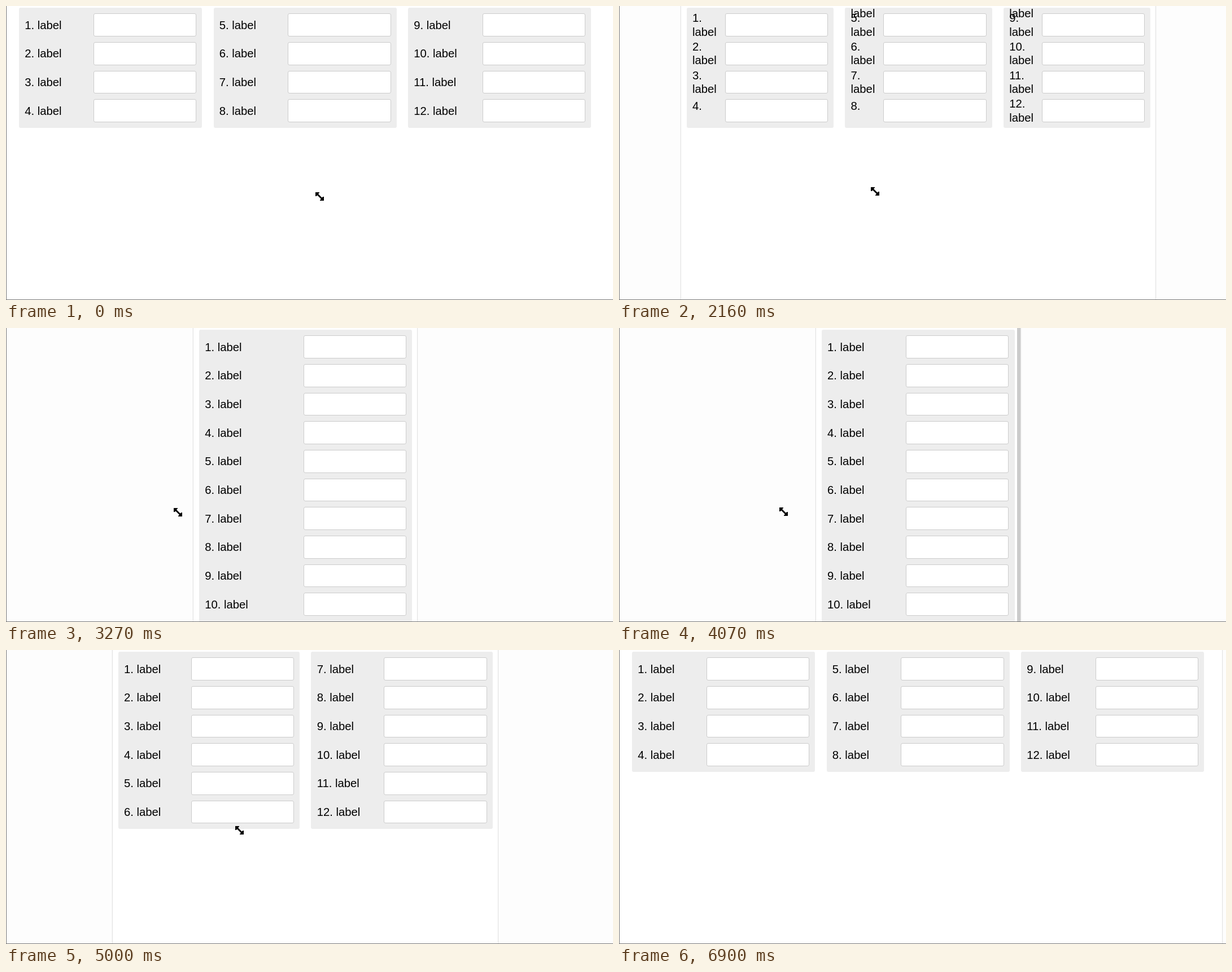
Recreate the animation shown at these times as an HTML page. Size 1075 by 521 pixels, loop 7.31 s.

```html
<!DOCTYPE html>
<html lang="en">
<head>
<meta charset="utf-8">
<title>Responsive form columns</title>
<style>
  html, body { margin: 0; width: 100%; height: 100%; overflow: hidden; background: #fdfdfd; }
  #stage { position: absolute; left: 0; top: 0; width: 1075px; height: 521px; overflow: hidden;
    font: 20.27px/24.32px "Liberation Sans", Arial, sans-serif; color: #000; }
  #stage * { position: absolute; box-sizing: border-box; }
  #page { top: -10px; height: 560px; background: #fff; box-shadow: 0 0 2px rgba(0, 0, 0, .32); }
  #thumb { top: 0; width: 6px; height: 521px; background: #cbcbcb; }
  .panel { top: 3.3px; background: #ededed; border-radius: 3px; }
  .field { height: 40.53px; background: #fff; border: 1px solid #ccc; border-radius: 3px; }
  .text { white-space: pre; }
  #cursor { left: 0; top: 0; }
  #frame { inset: 0; border: solid #777; border-width: 0 0 1px 1px; }
</style>
</head>
<body>
<div id="stage">
  <div id="page"></div>
  <div id="form"></div>
  <div id="thumb"></div>
  <svg id="cursor" width="15" height="15">
    <path d="M0 0H7V1L5 3 11.5 9.5 13.5 8H15V15H8V14L10 12 3.5 5.5 1.5 7H0Z"/>
  </svg>
  <div id="frame"></div>
</div>
<script>
const LOOP = 7310, COUNT = 12;
const U = 1.01333;
const PAD = 10 * U, GAP = 20 * U, PITCH = 50 * U, LINE = 24.32;
const FIELD = 180 * U, MIN_COL = 250 * U, MAX_FORM = 1000 * U, TOP = 3.3;
const AXIS = 1059;                       // left + right edge of the centred page

// time, page left edge, lag of the content's right side, cursor x, cursor y
const KEYS = [
  [0, -38, 0, 555, 337.5],
  [1019, -38, 0, 555, 337.5],
  [1020, -38, 0, 555, 336.5],
  [1300, -38, 0, 555, 336.5],
  [1310, -20, 2, 552, 336],
  [1550, 9.5, 4, 523, 332],
  [1620, 9.5, 4, 523, 332],
  [2040, 81, 2, 473, 329],
  [2710, 237.5, 1.5, 364.5, 326.5],
  [2770, 237.5, 1.5, 364.5, 326.5],
  [2830, 255, 2, 353, 326.5],
  [3270, 331.5, 2, 304.5, 326.5],
  [3300, 331.5, 2, 304.5, 326.5],
  [3510, 350, 0, 290, 325.5],
  [4060, 350, 0, 290, 325.5],
  [4480, 291, 4, 345, 321],
  [4510, 291, 4, 345, 321],
  [4750, 243, 2, 377, 320],
  [5530, 73, 0, 491, 318.5],
  [5650, 61.5, -1, 498.5, 318.5],
  [5710, 61.5, -1, 498.5, 318.5],
  [6310, 6, 0, 541, 320],
  [6520, -8, 0, 552, 320.5],
  [6700, -8, 0, 552, 320.5],
  [6890, -8, 0, 538.5, 295.5],
  [LOOP, -8, 0, 538.5, 295.5]
];

const $ = id => document.getElementById(id);
const form = $("form");

function add(cls) {
  const el = document.createElement("div");
  el.className = cls;
  form.append(el);
  return el;
}

function place(el, x, y, w) {
  el.style.left = x + "px";
  el.style.top = y + "px";
  if (w !== undefined) el.style.width = w + "px";
}

function write(el, text) {
  if (el.textContent !== text) el.textContent = text;
}

const panels = [0, 1, 2].map(() => add("panel"));
const items = Array.from({ length: COUNT }, () => ({
  field: add("field"), head: add("text"), tail: add("text")
}));

const pen = document.createElement("canvas").getContext("2d");
pen.font = '20.27px "Liberation Sans", Arial, sans-serif';
const widths = items.map((_, i) => pen.measureText(`${i + 1}. label`).width);

function sample(t) {
  let i = 1;
  while (i < KEYS.length - 1 && KEYS[i][0] <= t) i++;
  const a = KEYS[i - 1], b = KEYS[i], k = (t - a[0]) / (b[0] - a[0]);
  return a.map((v, n) => v + (b[n] - v) * k);
}

function layout(left, lag) {
  let x0 = left + 10.5, width = AXIS - left - PAD + lag - x0;
  if (width > MAX_FORM) {
    x0 += (width - MAX_FORM) / 2;
    width = MAX_FORM;
  }
  const cols = Math.max(1, Math.min(3, Math.floor((width + GAP) / (MIN_COL + GAP))));
  const rows = COUNT / cols;
  const colW = (width - GAP * (cols - 1)) / cols;
  const inner = colW - 2 * PAD;
  const fieldW = Math.max(FIELD, (inner - PAD) / 2);
  const room = inner - PAD - fieldW;
  const colX = c => x0 + c * (colW + GAP);

  panels.forEach((p, c) => {
    p.style.display = c < cols ? "block" : "none";
    p.style.height = PAD + rows * PITCH + "px";
    place(p, colX(c), TOP, colW);
  });

  items.forEach((item, i) => {
    const col = Math.floor(i / rows), row = i % rows;
    const x = colX(col) + PAD, y = TOP + PAD + row * PITCH, mid = y + 20 * U;
    place(item.field, x + inner - fieldW, y, fieldW);
    const wrap = widths[i] > room;
    // a wrapped label at a column's end spills into the next column
    const spill = wrap && row === rows - 1 && col < cols - 1;
    write(item.head, `${i + 1}.` + (wrap ? "" : " label"));
    write(item.tail, wrap ? "label" : "");
    place(item.head, x, spill ? y : mid - LINE / (wrap ? 1 : 2));
    place(item.tail, spill ? colX(col + 1) + PAD : x, spill ? 0.8 : mid);
  });
  return cols;
}

function draw(t) {
  const [, left, lag, cx, cy] = sample(t);
  place($("page"), left + 0.5, -10, AXIS - 2 * left);
  const cols = layout(left, lag);

  const thumb = $("thumb");
  thumb.style.display = cols === 1 && t >= 4070 ? "block" : "none";
  thumb.style.left = AXIS - left - 6 + "px";

  const cursor = $("cursor");
  cursor.style.display = t < 6900 ? "block" : "none";
  cursor.style.transform = `translate(${Math.round(cx - 7.5)}px, ${Math.round(cy - 7.5)}px)`;
}

const start = performance.now();
function tick() {
  draw((performance.now() - start) % LOOP);
  requestAnimationFrame(tick);
}
tick();
</script>
</body>
</html>
```
